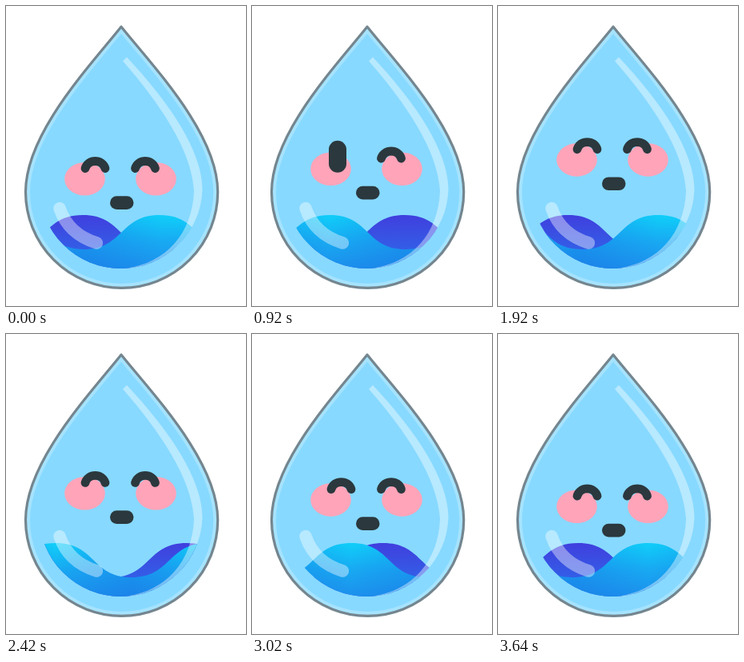
Write an HTML page with a canvas that moves like this. It is 300 px wide and 376 px high and loops after 3680 ms.

```html
<!DOCTYPE html>
<html lang="en">
<head>
<meta charset="utf-8">
<title>Water drop</title>
<style>
html, body { margin: 0; width: 100%; height: 100%; overflow: hidden; background: #fff; }
canvas { display: block; width: 300px; height: 376px; }
</style>
</head>
<body>
<canvas id="stage" width="300" height="376"></canvas>
<script>
const ctx = document.getElementById('stage').getContext('2d');
const LOOP = 3680;
const WAVELENGTH = 190;
const CREST_Y = 262, TROUGH_Y = 305;
const TAU = Math.PI * 2;
const INK = '#2b383d';

const drop = new Path2D(
  'M144 26 C104 76 24.5 160 24.5 233 A120.1 120.4 0 0 0 264.7 233 C264.7 160 184 76 144 26 Z');
const shine = new Path2D(
  'M146 69 L151 64 C205 122 245.5 182 245.5 230 A102 102 0 0 1 150 328.8 ' +
  'C200 322 233 285 235 232 C232 180 192 122 146 69 Z');
const glint = new Path2D('M67 253.5 Q78 286 113.5 297');
const bowl = new Path2D();
bowl.arc(143.5, 227, 102, 0, TAU);

function stroke(path, color, width) {
  ctx.strokeStyle = color;
  ctx.lineWidth = width;
  ctx.stroke(path);
}

function pill(x, y, w, h) {
  ctx.fillStyle = INK;
  ctx.beginPath();
  ctx.roundRect(x, y, w, h, Math.min(w, h) / 2);
  ctx.fill();
}

function cheek(x) {
  ctx.fillStyle = '#ffa4b9';
  ctx.beginPath();
  ctx.ellipse(x, 216.8, 25.3, 20.8, 0, 0, TAU);
  ctx.fill();
}

function smilingEye(x) {
  stroke(new Path2D(`M${x - 12.5} 203.5 C${x - 9} 191.5 ${x + 9} 191.5 ${x + 12.5} 203.5`), INK, 10.8);
}

function gradient(x0, y0, x1, y1, colors) {
  const g = ctx.createLinearGradient(x0, y0, x1, y1);
  colors.forEach((c, i) => g.addColorStop(i / (colors.length - 1), c));
  return g;
}

function wave(crest) {
  const half = WAVELENGTH / 2;
  const handle = half * 0.53;
  const path = new Path2D();
  let x = crest % WAVELENGTH - 2 * WAVELENGTH;
  let y = CREST_Y;
  path.moveTo(x, 340);
  path.lineTo(x, y);
  while (x < 300) {
    const nextY = CREST_Y + TROUGH_Y - y;
    path.bezierCurveTo(x + handle, y, x + half - handle, nextY, x + half, nextY);
    x += half;
    y = nextY;
  }
  path.lineTo(x, 340);
  path.closePath();
  return path;
}

function drawBody() {
  ctx.fillStyle = '#87d9ff';
  ctx.fill(drop);
  ctx.save();
  ctx.clip(drop);
  stroke(drop, '#a6e3fe', 11);
  ctx.restore();
  stroke(drop, '#74868f', 3.2);
}

function drawWater(t) {
  const shift = 2 * WAVELENGTH * t / LOOP;
  const crest = (192 + shift) % WAVELENGTH;
  ctx.save();
  ctx.clip(bowl);
  ctx.fillStyle = gradient(0, CREST_Y, 0, 312, ['#403fde', '#3163e8']);
  ctx.fill(wave(96 - shift));

  const front = wave(crest);
  ctx.fillStyle = gradient(0, CREST_Y, 0, 329, ['#10cff9', '#18a9f2', '#1c90ec']);
  ctx.fill(front);
  // Darker blue in the troughs, travelling with the wave.
  const clear = 'rgba(24,100,226,0)', deep = 'rgba(24,100,226,0.3)';
  ctx.fillStyle = gradient(crest - WAVELENGTH, 0, crest + WAVELENGTH, 0,
    [clear, deep, clear, deep, clear]);
  ctx.fill(front);
  ctx.restore();
}

function drawGloss() {
  ctx.fillStyle = 'rgba(255,255,255,0.4)';
  ctx.fill(shine);
  stroke(glint, 'rgba(255,255,255,0.4)', 15.5);
}

function drawFace(t) {
  const lift = 25 * (1 - Math.abs(1 - 2 * t / LOOP));
  const leftOpen = t >= 240 && t < 1640;
  ctx.save();
  ctx.translate(0, -lift);
  cheek(98.5);
  cheek(187.5);
  if (leftOpen) pill(96, 181.3, 22, 40);
  else smilingEye(111.5);
  smilingEye(174);
  pill(130, 238.3, 29.5, 16.7);
  ctx.restore();
}

function draw(now) {
  const t = now % LOOP;
  ctx.fillStyle = '#fff';
  ctx.fillRect(0, 0, 300, 376);
  ctx.lineCap = 'round';
  ctx.lineJoin = 'round';
  drawBody();
  drawWater(t);
  drawGloss();
  drawFace(t);
}

const start = performance.now();
function tick() {
  draw(performance.now() - start);
  requestAnimationFrame(tick);
}
tick();
</script>
</body>
</html>
```
